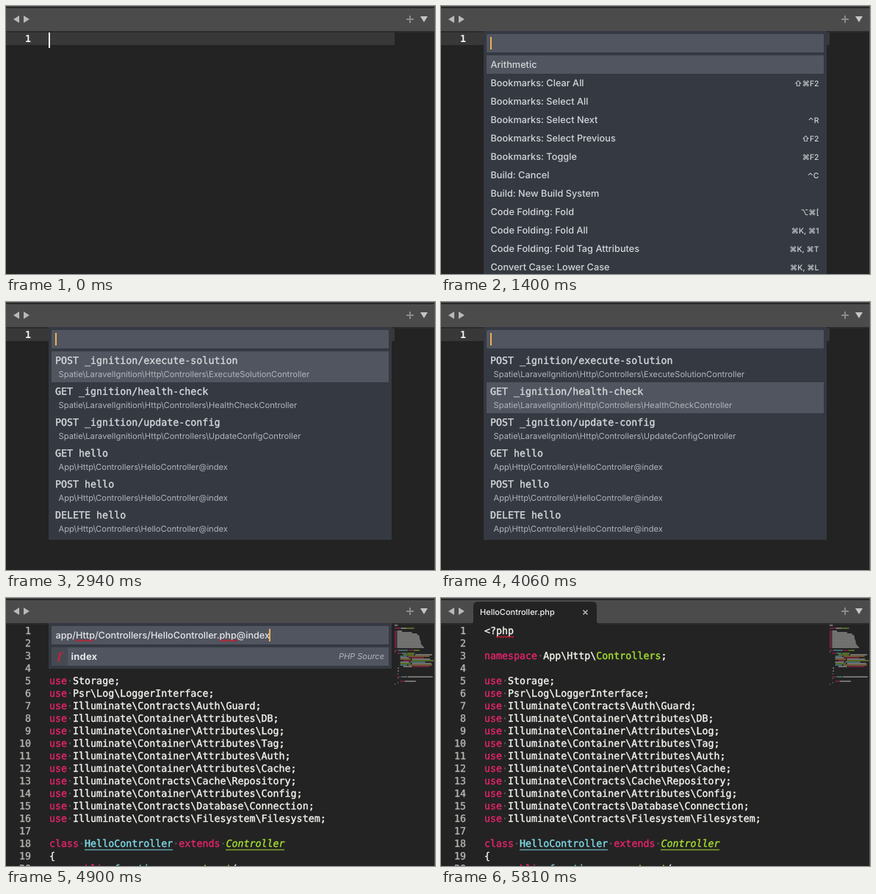
These frames come from a looping animation (584 px wide and 364 px high, 7.28 s). An HTML page:

```html
<!DOCTYPE html>
<html lang="en">
<head>
<meta charset="utf-8">
<style>
  html, body { margin: 0; width: 100%; height: 100%; overflow: hidden; background: #232323; }
  svg { display: block; width: 584px; height: 364px; }
  text { white-space: pre; text-rendering: geometricPrecision; font: 500 12.65px Inter, "DejaVu Sans", sans-serif; fill: #e4e6ea; }
  .mono { font: 13.32px "DejaVu Sans Mono", monospace; stroke-width: .38px; }
  .row { font-size: 12.75px; fill: #d3d6da; }
  .key { font-size: 10.4px; fill: #d3d6da; text-anchor: end; }
  .sub { font-size: 11.2px; font-weight: 400; fill: #b1b5bc; }
  .strong { font-weight: 700; }
  .title { font-size: 13px; font-weight: 700; letter-spacing: .2px; }
  .num { text-anchor: end; }
</style>
</head>
<body>
<svg id="stage" viewBox="0 0 584 364"></svg>
<script>
const LOOP = 7280, TICK = 70;
const C = {
  bg: '#232323', bar: '#4b4b4b', panel: '#353941', field: '#50555f', caret: '#f0b050',
  white: '#f5f5f0', pink: '#e8246c', green: '#a6e22e', cyan: '#7fdcea', dot: '#585858', error: '#c01f30'
};
const stage = document.getElementById('stage');

function add(parent, tag, attrs = {}, content) {
  const node = document.createElementNS('http://www.w3.org/2000/svg', tag);
  for (const name in attrs) node.setAttribute(name, attrs[name]);
  if (content !== undefined) node.textContent = content;
  parent.appendChild(node);
  return node;
}
const group = (parent = stage) => add(parent, 'g');
const rect = (parent, x, y, width, height, fill, rx = 0) => add(parent, 'rect', { x, y, width, height, fill, rx });
const path = (parent, d, attrs) => add(parent, 'path', { d, ...attrs });
const label = (parent, x, y, cls, content, style = '') => add(parent, 'text', { x, y, class: cls, style }, content);
const inked = color => `fill:${color};stroke:${color}`;
const show = (node, on) => node.setAttribute('visibility', on ? 'visible' : 'hidden');

function squiggle(parent, x, end, y) {
  let d = `M${x} ${y}`;
  for (let i = 1; x + i * 2 <= end; i++) d += `l2 ${i % 2 ? 1.5 : -1.5}`;
  path(parent, d, { fill: 'none', stroke: C.error, 'stroke-width': 1.4 });
}

function spacedText(parent, x, y, content) {
  const node = label(parent, x, y, '', '');
  content.split(' ').forEach((word, i) => {
    // The invisible-space marker is about as wide as a space.
    if (i) add(node, 'tspan', { fill: '#9297a0' }, '·');
    add(node, 'tspan', {}, word);
  });
}

// Window
rect(stage, 0, 0, 584, 364, C.bg);

const blank = group();
rect(blank, 0, 36, 529, 17, '#383838');
label(blank, 34, 49, 'mono num strong', '1', 'fill:#f4f4f4');
const editCaret = rect(blank, 58, 36, 2, 21, '#ffffff');

// Source file
const file = group();
const use = name => [['pink', 'use'], ['dot', '·'], ['white', name + ';']];
const code = [
  [['white', '<?php']],
  [],
  [['pink', 'namespace'], ['dot', '·'], ['white', 'App\\Http\\'], ['green', 'Controllers'], ['white', ';']],
  [],
  ...['Storage', 'Psr\\Log\\LoggerInterface', 'Illuminate\\Contracts\\Auth\\Guard',
    ...['DB', 'Log', 'Tag', 'Auth', 'Cache'].map(name => 'Illuminate\\Container\\Attributes\\' + name),
    'Illuminate\\Contracts\\Cache\\Repository', 'Illuminate\\Container\\Attributes\\Config',
    'Illuminate\\Contracts\\Database\\Connection', 'Illuminate\\Contracts\\Filesystem\\Filesystem'].map(use),
  [],
  [['pink', 'class'], ['dot', '·'], ['cyan', 'HelloController'], ['dot', '·'], ['pink', 'extends'],
    ['dot', '·'], ['green', 'Controller', 'italic']],
  [['white', '{']],
  [['dot', '····'], ['pink', 'public'], ['dot', '·'], ['cyan', 'function'], ['dot', '·'],
    ['green', '__construct'], ['white', '(']]
];
const minimap = group(file);
minimap.setAttribute('opacity', .62);
const speck = (line, column, length, color) =>
  rect(minimap, 529 + column * .85, 36.5 + line * 2, Math.min(length * .85, 54 - column * .85), 1.2, C[color]);

code.forEach((tokens, line) => {
  const y = 49 + line * 17;
  label(file, 34, y, 'mono num', line + 1, inked('#b4b4b0'));
  const node = label(file, 59, y, 'mono', '');
  let column = 0;
  for (const [color, content, slant = 'normal'] of tokens) {
    add(node, 'tspan', { style: `${inked(C[color])};font-style:${slant}` }, content);
    if (color !== 'dot') speck(line, column, content.length, color);
    column += content.length;
  }
});
squiggle(file, 75, 99, 52);
rect(file, 107, 341.5, 120, 1, C.cyan);
rect(file, 299, 341.5, 80, 1, C.green);

const body = ['pink', 'white', 'green', 'cyan', 'white', 'caret'];
for (let line = 20; line < 29; line++) {
  const indent = line === 27 ? 9 : line % 4 ? 9 : 14;
  speck(line, indent, 11 + line % 3 * 3, body[line % 6]);
  speck(line, indent + 13 + line % 3 * 3, 20 + line * 7 % 19, body[(line + 2) % 6]);
}
[[29, 5, 2, 'white'], [31, 5, 2, 'white'], [33, 5, 1, 'white'], [35, 4, 6, 'pink'], [35, 11, 9, 'cyan'],
  [35, 21, 40, 'white'], [36, 5, 1, 'white'], [38, 9, 6, 'pink'], [38, 16, 18, 'white'],
  [39, 5, 1, 'white'], [40, 0, 1, 'white']].forEach(item => speck(...item));

// Tab strip
rect(stage, 0, 0, 584, 2, '#424242');
rect(stage, 0, 2, 584, 1, '#111111');
rect(stage, 0, 3, 584, 31, C.bar);
rect(stage, 0, 3, 584, 1, '#565656');
rect(stage, 0, 34, 584, 2, '#2b2b2b');

const tab = group();
const clip = add(add(stage, 'clipPath', { id: 'tabClip' }), 'rect', { x: 40, y: 5, width: 0, height: 31 });
const tabShape = path(tab, '', { fill: C.bg });
const tabFace = add(tab, 'g', { 'clip-path': 'url(#tabClip)' });
label(tabFace, 53, 23, '', 'HelloController.php', 'font-size:11px;fill:#f0f0f0');
const tabClose = path(tabFace, 'M-3 -3L3 3M3 -3L-3 3', { stroke: '#b8b8b8', 'stroke-width': 1.5 });

path(stage, 'M10 18l8-5v10zM32 18l-8-5v10z', { fill: '#b9b9b9' });
path(stage, 'M545 18h10M550 13v10', { stroke: '#8a8a8a', 'stroke-width': 2 });
path(stage, 'M564 14h10l-5 8z', { fill: '#c6c6c6' });
rect(stage, 583, 0, 1, 364, '#5a5a5a');

// Overlay panels
function makePanel(bottom, caretX) {
  const panel = group();
  rect(panel, 58, 34, 467, bottom - 34, C.panel);
  rect(panel, 62, 38, 459, 25, C.field, 1.5);
  rect(panel, caretX, 42, 2, 17, C.caret);
  return panel;
}
const selection = (panel, height) => rect(panel, 62, 67, 459, height, C.field);

const commands = makePanel(364, 67);
selection(commands, 25);
[['Arithmetic'], ['Bookmarks: Clear All', '⇧⌘F2'], ['Bookmarks: Select All'], ['Bookmarks: Select Next', '⌃R'],
  ['Bookmarks: Select Previous', '⇧F2'], ['Bookmarks: Toggle', '⌘F2'], ['Build: Cancel', '⌃C'],
  ['Build: New Build System'], ['Code Folding: Fold', '⌥⌘['], ['Code Folding: Fold All', '⌘K, ⌘1'],
  ['Code Folding: Fold Tag Attributes', '⌘K, ⌘T'], ['Convert Case: Lower Case', '⌘K, ⌘L']
].forEach(([name, keys], i) => {
  label(commands, 67.5, 84 + i * 25, 'row', name);
  if (keys) label(commands, 514.5, 84 + i * 25, 'key', keys);
});
const scrollbar = rect(commands, 514, 68, 7, 24, '#7d828b');

const search = makePanel(96, 297);
const query = 'Laravel Goto: Go to Controller via Uris';
selection(search, 25);
spacedText(search, 67.5, 55, query);
squiggle(search, 68, 111, 57);
squiggle(search, 115, 147, 57);
label(search, 67.5, 84, 'title', query);

const routes = makePanel(323, 67);
const routeSelection = selection(routes, 42);
const ignition = name => `Spatie\\LaravelIgnition\\Http\\Controllers\\${name}Controller`;
const hello = 'App\\Http\\Controllers\\HelloController@index';
[['POST _ignition/execute-solution', ignition('ExecuteSolution')],
  ['GET _ignition/health-check', ignition('HealthCheck')],
  ['POST _ignition/update-config', ignition('UpdateConfig')],
  ['GET hello', hello], ['POST hello', hello], ['DELETE hello', hello]
].forEach(([route, action], i) => {
  label(routes, 67, 84 + i * 42, 'mono', route, inked('#d6d9dd'));
  label(routes, 71.5, 102 + i * 42, 'sub', action);
});

const symbols = makePanel(96, 358);
selection(symbols, 25);
label(symbols, 67.5, 55, '', 'app/Http/Controllers/HelloController.php@index');
squiggle(symbols, 95, 120, 57);
squiggle(symbols, 291, 315, 57);
rect(symbols, 62, 67, 22, 25, '#454952');
label(symbols, 70, 84, '', 'f', 'font:italic bold 14px "DejaVu Serif","Noto Serif",serif;fill:#c8203f');
label(symbols, 88.5, 83.5, 'title', 'index');
label(symbols, 515, 83, 'sub num', 'PHP Source', 'font-size:11px;font-style:italic');

function drawTab(progress) {
  const right = 40 + 176 * progress;
  show(tab, progress > 0);
  if (progress <= 0) return;
  tabShape.setAttribute('d', `M40 36q4 0 4-6V11q0-6 6-6H${Math.max(50, right - 10)}q6 0 6 6V30q0 6 4 6z`);
  clip.setAttribute('width', Math.max(0, right - 44));
  tabClose.setAttribute('transform', `translate(${right - 19.5} 19.5)`);
}

function render(t) {
  const during = (from, to) => t >= from && t < to;
  show(blank, t < 4900);
  show(editCaret, t < 840);
  show(commands, during(840, 2170));
  scrollbar.setAttribute('opacity', t < 1330 ? 1 : t < 1400 ? .5 : 0);
  show(search, during(2170, 2870));
  show(routes, during(2870, 4900));
  const selected = [4060, 4270, 4480].filter(time => t >= time).length;
  routeSelection.setAttribute('y', 67 + selected * 42);
  show(file, t >= 4900);
  show(symbols, during(4900, 5390));
  const step = Math.min(7, Math.max(0, Math.floor((t - 5390) / TICK) + 1));
  drawTab(1 - (1 - step / 7) ** 2);
}

const start = performance.now();
function frame() {
  render((performance.now() - start) % LOOP);
  requestAnimationFrame(frame);
}
frame();
</script>
</body>
</html>
```
